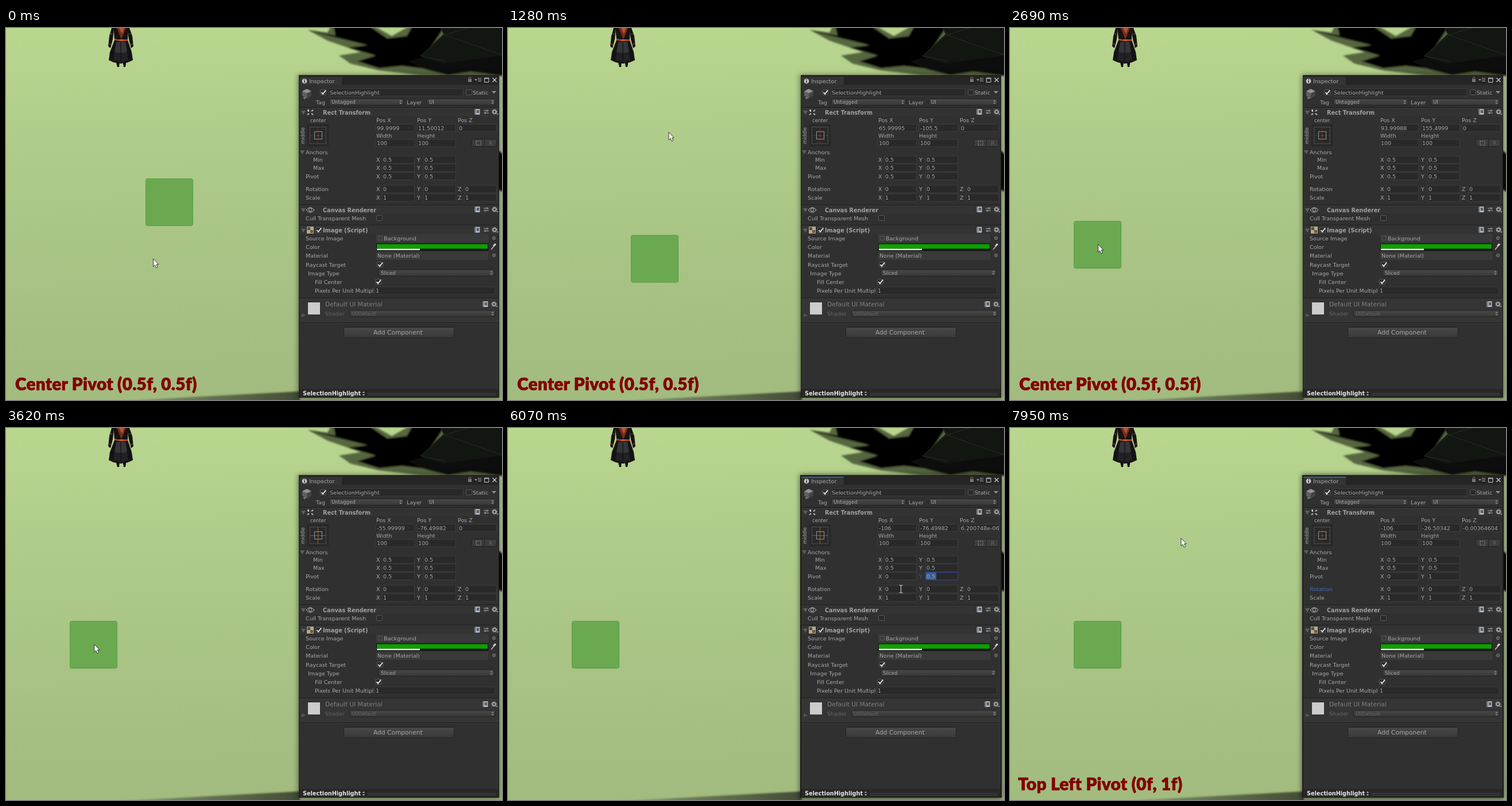
Write an HTML page that moves like this. It is 864 px wide and 648 px high and loops after 8 s.

```html
<!DOCTYPE html>
<html lang="en">
<head>
<meta charset="utf-8">
<title>Pivot demo</title>
<style>
html, body { margin: 0; width: 100%; height: 100%; overflow: hidden; background: #adc788; }
svg { display: block; }
text { font: 9.5px "DejaVu Sans", sans-serif; fill: #a8a8a8; white-space: pre; }
.bold { font-weight: bold; font-size: 9.7px; fill: #a0a0a0; }
.small { font-size: 8.5px; }
.big { font-size: 10.65px; }
.dim { fill: #808080; }
.faint { fill: #666; }
.white { fill: #e4e4e4; }
#caption { font: 900 29.7px Lato, sans-serif; letter-spacing: .3px; fill: #820000; stroke: #820000; stroke-width: .7; stroke-linejoin: round; }
</style>
</head>
<body>
<svg id="stage" width="864" height="648" viewBox="0 0 864 648"></svg>
<script>
const LOOP = 8000;
const stage = document.getElementById('stage');

// Drawing helpers; y is the middle of a row
const rect = (x, y, w, h, fill, extra = '') =>
  `<rect x="${x}" y="${y}" width="${w}" height="${h}" fill="${fill}" ${extra}/>`;
const poly = (points, fill, extra = '') => `<polygon points="${points}" fill="${fill}" ${extra}/>`;
const path = (d, stroke = '#999', extra = '') => `<path d="${d}" fill="none" stroke="${stroke}" ${extra}/>`;
const text = (x, y, str, cls = '', id = '') =>
  `<text x="${x}" y="${y + 3.5}" class="${cls}" id="${id}">${str}</text>`;
const box = (x, y, w, id = '', fill = '#292929') =>
  rect(x + .5, y - 6.5, w - 1, 13, fill, `stroke="#3d3d3d" id="${id}"`);
const field = (x, y, w, str, id = '') =>
  box(x, y, w, id && id + 'Box') +
  (id ? rect(x + 1, y - 6, 18, 12, '#35609c', `id="${id}Mark" visibility="hidden"`) : '') +
  `<svg x="${x}" y="${y - 8}" width="${w}" height="16">${text(2, 8, str, '', id)}</svg>`;
const dropdown = (x, y, w, str, cls = '') =>
  rect(x + .5, y - 5.5, w - 1, 11, 'url(#raised)', 'rx="2" stroke="#232323"') +
  text(x + 4, y - .3, str, 'small ' + cls) +
  poly(`${x + w - 8},${y - 1} ${x + w - 3},${y - 1} ${x + w - 5.5},${y - 3.5}`, '#888') +
  poly(`${x + w - 8},${y + 1} ${x + w - 3},${y + 1} ${x + w - 5.5},${y + 3.5}`, '#888');
const check = (x, y, on) =>
  rect(x + .5, y - 4.5, 10, 9, '#2a2a2a', 'rx="1" stroke="#5a5a5a"') +
  (on ? path(`M${x + 2.5} ${y}l2.5 3l5 -6.5`, '#eee', 'stroke-width="1.8"') : '');
const fold = (x, y) => poly(`${x - 4},${y - 3} ${x + 4},${y - 3} ${x},${y + 4}`, '#5e5e5e');
const line = y => rect(510, y, 349, 1, '#1c1c1c') + rect(510, y + 1, 349, 1, '#3b3b3b');
const picker = y => `<circle cx="850" cy="${y}" r="2.6" fill="none" stroke="#888"/><circle cx="850" cy="${y}" r=".9" fill="#888"/>`;
const gear = (x, y) =>
  `<circle cx="${x}" cy="${y}" r="3.4" fill="none" stroke="#aaa" stroke-width="2.4" stroke-dasharray="1.8 .87"/>` +
  `<circle cx="${x}" cy="${y}" r="2.4" fill="none" stroke="#aaa" stroke-width="1.2"/>` +
  poly(`${x + 3},${y + 3} ${x + 7},${y + 3} ${x + 5},${y + 5.5}`, '#999');
const book = (x, y) => rect(x - 4.5, y - 5, 9, 10, '#b5b5b5', 'rx="1"') +
  rect(x - 4.5, y - 5, 2, 10, '#777') + rect(x - 1, y - 3, 4, 5, '#465d79');
const tools = y => book(821, y - 1) +
  path(`M832 ${y - 3}h9M832 ${y + 1}h9M838 ${y - 5}v4M835 ${y - 1}v4`, '#aaa') + gear(851, y - 1);
const header = (y, str, x = 552) =>
  rect(510, y - 7, 349, 14, '#333') + fold(518, y) + text(x, y, str, 'bold') + tools(y);
const axes = (y, label, x, values, name) => text(x, y, label, '', name && name + 'Label') +
  values.map((v, i) => text([645, 716, 787][i], y, 'XYZ'[i], '', name === 'pivot' ? 'label' + 'XY'[i] : '') +
    field([655, 727, 798][i], y, 57, v, name === 'pivot' ? 'pivot' + 'XY'[i] : '')).join('');

const defs = `<defs>
  <linearGradient id="ground" x2=".04" y2="1">
    <stop stop-color="#bad790"/><stop offset=".3" stop-color="#b0cc8a"/>
    <stop offset=".7" stop-color="#a7c284"/><stop offset="1" stop-color="#a2bb7f"/></linearGradient>
  <linearGradient id="raised" x2="0" y2="1"><stop stop-color="#484848"/><stop offset="1" stop-color="#383838"/></linearGradient>
  <linearGradient id="dusk"><stop stop-color="#81966a"/><stop offset="1" stop-color="#434b35"/></linearGradient>
  <filter id="soft" x="-10%" y="-30%" width="120%" height="160%"><feGaussianBlur stdDeviation="1.6"/></filter>
  <filter id="shade" x="-5%" y="-5%" width="110%" height="110%"><feGaussianBlur stdDeviation="4"/></filter>
</defs>`;

const figure = () =>
  poly('184,0 180,14 178,32 182,35 186,20 188,0', '#17130f') +
  poly('215,0 220,14 222,32 218,35 214,20 211,0', '#17130f') +
  path('M181 9l4 2M179 27l4 2M219 9l-4 2M221 27l-4 2', '#a15a2b') +
  poly('191,56 198,56 197,68 194,68', '#130e0e') + poly('203,56 210,56 208,68 205,68', '#130e0e') +
  poly('187,0 213,0 212,20 189,20', '#171414') +
  poly('193,0 209,0 201,20', '#7c2a18') + poly('197,0 206,0 202,10', '#a85a3a') +
  poly('189,21 212,21 219,42 221,56 212,60 200,62 188,60 179,56 181,42', '#131315') +
  poly('192,24 208,24 211,42 200,45 189,42', '#353539') +
  poly('189,43 211,43 213,56 200,60 187,56', '#212124') +
  path('M189 20l11 2l12 -1', '#b6491d', 'stroke-width="2.4"') + path('M200 24v36', '#0c0c0d');

const scenery = () =>
  rect(0, 0, 864, 648, 'url(#ground)') +
  `<g filter="url(#soft)">
  ${poly('200,650 360,641 512,633 512,650', 'url(#dusk)')}
  ${poly('525,3 560,8 566,-4 640,-4 672,14 704,-4 870,-4 870,84 720,82 650,74 600,62 580,48 618,42 560,22', '#57663f')}
  ${poly('528,5 574,13 570,-4 632,-4 664,18 698,14 708,-4 765,-4 730,50 738,72 690,66 650,70 612,58 644,48 596,34 630,30', '#040504')}
  ${poly('700,58 740,48 870,44 870,84 810,76 770,82 730,72', '#080a07')}
  ${poly('856,212 866,220 866,286 856,280', '#070906')}</g>` +
  poly('757,0 864,0 864,48 760,62 721,49 762,11', '#121611') +
  path('M757 0l7 12l-42 37M764 12l100 35M764 12l40 -12M722 49l45 9', '#2a3327', 'stroke-width=".8"') +
  figure();

const titleBar = () =>
  rect(510, 82, 349, 17, '#252525') + rect(510, 85, 75, 14, '#343434') +
  rect(511, 85, 74, 1.5, '#3472b4', 'id="tabLine"') +
  `<circle cx="520" cy="92.5" r="4.3" fill="#c8c8c8"/>` + rect(519.3, 91.5, 1.5, 4, '#222') + rect(519.3, 89.3, 1.5, 1.4, '#222') +
  text(528, 92.5, 'Inspector') +
  rect(805, 89, 6, 5, '#777') + path('M806.5 89v-3h3v3', '#777') +
  poly('816,89 821,89 818.5,92', '#999') + path('M822 87.5h6M822 90h6M822 92.5h6', '#999') +
  path('M833.5 87h7.5v7.5h-7.5zM833 88h8', '#ccc') + path('M847.5 87l7 7m0 -7l-7 7', '#ccc', 'stroke-width="1.3"');

const objectRows = () =>
  poly('516,110 524,106 532,110 524,114', '#929292') + poly('516,110 524,114 524,123 516,118', '#606060') +
  poly('532,110 524,114 524,123 532,118', '#444') + poly('517,121 523,121 520,124', '#888') +
  check(547, 112, true) + box(562, 112, 235) + text(564, 112, 'SelectionHighlight') +
  check(801, 112) + text(813, 112, 'Static') + poly('846,110 854,110 850,114', '#999') +
  text(540, 129, 'Tag') + dropdown(563, 129, 130, 'Untagged') +
  text(698, 129, 'Layer') + dropdown(733, 129, 120, 'UI');

const transformRows = () =>
  line(138) + header(147, 'Rect Transform') +
  path('M525 143l3 2m-1 -3v4M535 143l-3 2M525 151l3 -2M535 151l-3 -2', '#ccc', 'stroke-width="1.8"') +
  text(530, 160, 'center', 'small') +
  `<text class="small" transform="translate(520 202) rotate(-90)">middle</text>` +
  rect(525.5, 168.5, 36, 37, '#2a2a2a', 'stroke="#242424"') + rect(529.5, 172.5, 28, 29, 'none', 'stroke="#4c4c4c"') +
  path('M543.5 173v28M530 187.5h27', '#642a1e', 'id="cross"') +
  rect(537.5, 180.5, 13, 13, 'none', 'stroke="#909090"') + rect(542.5, 186.5, 2, 2, '#a8502c') +
  ['Pos X', 'Pos Y', 'Pos Z'].map((s, i) => text([645, 716, 787][i], 160, s) +
    field([644, 716, 787][i], 174, 68, '', 'pos' + 'XYZ'[i])).join('') +
  text(645, 187, 'Width') + text(716, 187, 'Height') + field(644, 200.5, 68, '100') + field(716, 200.5, 68, '100') +
  rect(811.5, 193.5, 43, 13, '#3c3c3c', 'rx="2" stroke="#222"') + rect(833, 194, 1, 13, '#222') +
  rect(819, 197, 8, 7, 'none', 'stroke="#999" stroke-dasharray="2 1.5"') + text(841, 200, 'R', 'faint') +
  fold(516, 216) + text(522, 216, 'Anchors') +
  axes(229.5, 'Min', 535, ['0.5', '0.5']) + axes(243.5, 'Max', 535, ['0.5', '0.5']) +
  axes(258, 'Pivot', 522, ['0.5', '0.5'], 'pivot') +
  axes(280.5, 'Rotation', 522, ['0', '0', '0'], 'rotation') + axes(295.5, 'Scale', 522, ['1', '1', '1']);

const componentRows = () =>
  line(308) + header(317, 'Canvas Renderer') +
  path('M523 317q7 -8.5 14 0q-7 8.5 -14 0z', '#bbb') + `<circle cx="530" cy="316.6" r="2.8" fill="none" stroke="#bbb"/>` +
  text(522, 331, 'Cull Transparent Mesh') + check(645, 331) +
  line(343) + header(352.5, 'Image (Script)') +
  rect(524, 346, 12, 12, '#b4ab91') + rect(525, 347, 5, 5, '#544e41') + rect(530, 352, 5, 5, '#685c3a') + check(539, 352, true) +
  text(522, 366.5, 'Source Image') + box(645, 366.5, 195, '', '#393939') +
  rect(648.5, 362.5, 7, 7, 'none', 'stroke="#666" stroke-dasharray="1.5 1"') + text(658, 366, 'Background') + picker(366) +
  text(522, 381.5, 'Color') + rect(645, 375.5, 195, 12.5, '#111') + rect(646, 376.5, 193, 8, '#0ca000') +
  rect(646, 384.5, 75, 2.5, '#f2f2f2') + path('M845 386l5 -6', '#bbb', 'stroke-width="1.5"') + path('M849 380l4 -4', '#ddd', 'stroke-width="2.6"') +
  text(522, 396.5, 'Material') + box(645, 396.5, 195, '', '#393939') + text(647, 396.5, 'None (Material)') + picker(396) +
  text(522, 412, 'Raycast Target') + check(646, 412, true) +
  text(526, 427, 'Image Type') + dropdown(649, 426.5, 202, 'Sliced') +
  text(538, 442, 'Fill Center') + check(643, 442, true) +
  text(538, 457.5, 'Pixels Per Unit Multipl') + field(642, 457.5, 210, '1');

const footer = () =>
  line(470) + rect(510, 472, 349, 41, '#353535') + rect(526, 478, 21, 21, '#ccc') + poly('515,497 515,504 522,500.5', '#555') +
  text(556, 481.5, 'Default UI Material', 'big dim') + book(835, 481) + gear(850, 481) +
  text(556, 497.5, 'Shader', 'faint') + dropdown(598, 497.5, 255, 'UI/Default', 'faint') + line(513) +
  rect(588.5, 521.5, 192, 18, 'url(#raised)', 'rx="2" stroke="#222"') + text(640, 530, 'Add Component', 'big') +
  rect(510, 629, 349, 15, '#272727') + text(517, 636.5, 'SelectionHighlight', 'bold white') +
  poly('621,635.5 625,635.5 623,633', '#ccc') + poly('621,638 625,638 623,640.5', '#ccc') +
  path('M630 636.5h223M630 639.5h223', '#484848');

stage.innerHTML = defs + scenery() +
  rect(0, 0, 82, 82, '#6aa950', 'id="square" rx="3" stroke="#5d9a48"') +
  `<text id="caption" y="631"></text>` +
  rect(508, 81, 353, 566, '#000', 'id="shadow" filter="url(#shade)"') +
  rect(509, 82, 351, 562, '#1b1b1b', 'id="edge"') + rect(510, 82, 349, 561, '#303030') +
  titleBar() + objectRows() + transformRows() + componentRows() + footer() +
  rect(510.5, 82.5, 348, 561, 'none', 'stroke="#1d1d1d"') +
  rect(0, 252, 1, 12, '#ddd', 'id="caret"') +
  `<g id="pointer">
    ${poly('0,0 0,13.5 3,10.8 5.2,15.8 7.7,14.7 5.5,9.8 9.4,9.8', '#fff', 'id="arrow" stroke="#222" stroke-width=".9"')}
    ${path('M-3 -6.5h2.5l.5 .5l.5 -.5h2.5M0 -6v12M-3 6.5h2.5l.5 -.5l.5 .5h2.5', '#e0e0e0', 'id="beam"')}
  </g>`;
const el = {};
stage.querySelectorAll('[id]').forEach(node => { if (node.id) el[node.id] = node; });

// Each table: [start time, values...]
const squares = [[0, 243.5, 262.5], [330, 214.5, 361], [1460, 238.5, 140.5], [2690, 111.5, 336.5]];
const positions = [
  [0, '99.9999', '11.50012', '0'], [360, '65.99995', '-105.5', '0'], [1560, '93.99988', '155.4999', '0'],
  [2720, '-55.99999', '-76.49982', '0'], [5300, '-106', '-76.49982', '6.200748e-06'], [7050, '-106', '-26.50342', '-0.00364604']];
const captions = [[0, 'Center Pivot (0.5f, 0.5f)', 16], [3620, '', 0], [7780, 'Top Left Pivot (0f, 1f)', 14]];
// pivot x, pivot y, focused axis, selected?
const edits = [
  [0, '0.5', '0.5', ''], [4490, '0.5', '0.5', 'X', true], [5300, '0', '0.5', 'X', false], [5890, '0', '0.5', 'X', true],
  [6070, '0', '0.5', 'Y', true], [7050, '0', '1', 'Y', false], [7420, '0', '1', '']];
// start, end, x, y of each pointer move
const moves = [
  [0, 0, 256.5, 402], [1000, 1280, 280, 181.5], [2295, 2540, 153.5, 377],
  [3610, 4400, 682, 257], [4460, 4750, 684.5, 280.5], [7590, 7950, 298, 192]];

const at = (table, t) => table.filter(row => row[0] <= t).pop();
const show = (node, on) => node.setAttribute('visibility', on ? 'visible' : 'hidden');
const put = (node, value) => { if (node.textContent !== value) node.textContent = value; };

function pointerAt(t) {
  const i = moves.indexOf(at(moves, t));
  const [start, end, x, y] = moves[i];
  const [, , fromX, fromY] = moves[Math.max(0, i - 1)];
  const p = end > start ? Math.min(1, (t - start) / (end - start)) : 1;
  const e = p * p * (3 - 2 * p);
  return [fromX + (x - fromX) * e, fromY + (y - fromY) * e];
}

function render(t) {
  const [, sx, sy] = at(squares, t);
  el.square.setAttribute('x', sx);
  el.square.setAttribute('y', sy);

  const [, title, titleX] = at(captions, t);
  put(el.caption, title);
  el.caption.setAttribute('x', titleX);
  el.cross.setAttribute('stroke', title ? '#642a1e' : '#8a621c');

  const [, ...pos] = at(positions, t);
  pos.forEach((value, i) => put(el['pos' + 'XYZ'[i]], value));

  const [, pivotX, pivotY, focus, selected] = at(edits, t);
  show(el.caret, focus && !selected);
  [['X', pivotX, 655], ['Y', pivotY, 727]].forEach(([axis, value, x]) => {
    const on = focus === axis;
    put(el['pivot' + axis], value);
    el['label' + axis].style.fill = on ? '#3a58b0' : '';
    el[`pivot${axis}Box`].setAttribute('stroke', on ? '#2b459f' : '#3d3d3d');
    const mark = el[`pivot${axis}Mark`];
    mark.setAttribute('width', value.length > 1 ? 18 : 8);
    show(mark, on && selected);
    if (on) el.caret.setAttribute('x', x + 8.5);
  });
  el.rotationLabel.style.fill = t >= 7420 ? '#3e6bb5' : '';

  const active = t >= 4470;
  show(el.tabLine, active);
  show(el.edge, active);
  el.shadow.setAttribute('opacity', active ? .55 : .4);

  const [px, py] = pointerAt(t);
  const overField = px > 655 && px < 712;
  el.pointer.setAttribute('transform', `translate(${px.toFixed(1)} ${py.toFixed(1)})`);
  show(el.arrow, !overField);
  show(el.beam, overField);
}

const begin = performance.now();
function tick() {
  render((performance.now() - begin) % LOOP);
  requestAnimationFrame(tick);
}
tick();
</script>
</body>
</html>
```
